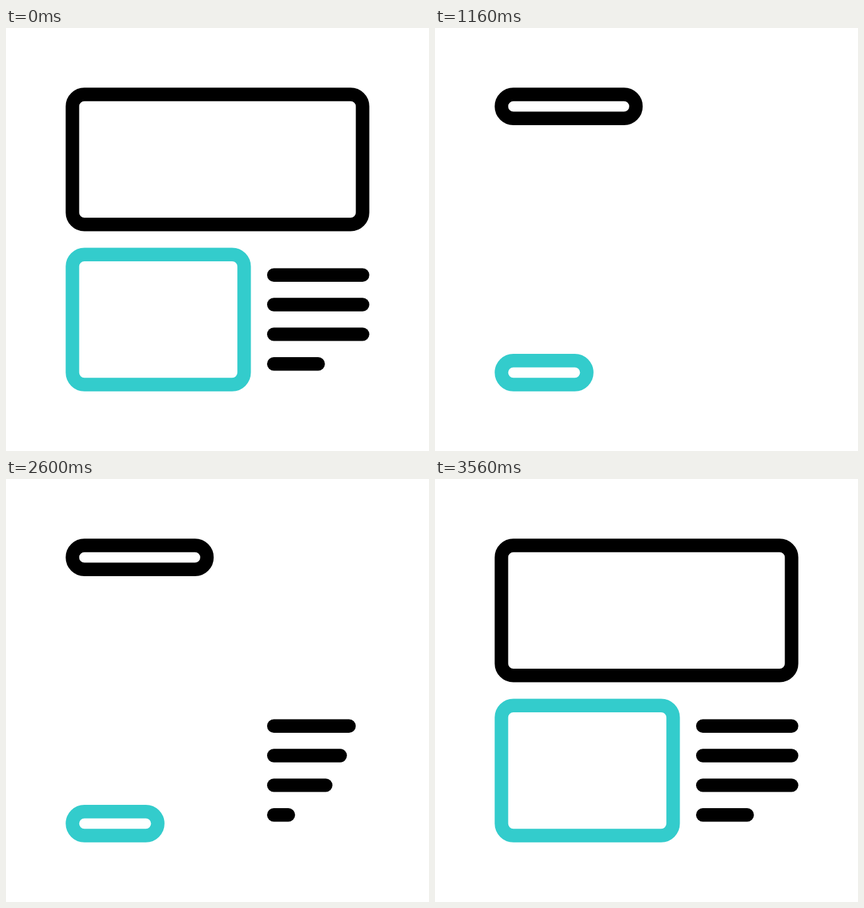
An HTML page that plays this animation: 640 px wide and 640 px high, repeating every 3600 ms.

```html
<!DOCTYPE html>
<html lang="en">
<head>
<meta charset="utf-8">
<title>Layout blocks</title>
<style>
html, body { margin: 0; width: 100%; height: 100%; overflow: hidden; background: #fff; }
svg { display: block; width: 100vw; height: 100vh; }
</style>
</head>
<body>
<svg viewBox="0 0 640 640" fill="none" stroke-width="20.4" stroke-linecap="round">
  <rect id="top" x="100.5" y="100.5" rx="18.15" stroke="#000"/>
  <rect id="card" x="100.5" rx="18.15" stroke="#3cc"/>
  <g id="lines" stroke="#000"></g>
</svg>
<script>
const NS = 'http://www.w3.org/2000/svg';
const LOOP = 3600, STEP = 20, SPAN = 800;
const MIN = 36.3, TALL = 196.8, FLOOR = 539.5;
const top_ = document.getElementById('top');
const card = document.getElementById('card');

// Each line leaves from the bottom up and returns from the top down.
const lines = [0, 1, 2, 3].map(i => {
  const el = document.getElementById('lines').appendChild(document.createElementNS(NS, 'line'));
  const y = 373.7 + 44.83 * i;
  el.setAttribute('x1', 405.2);
  el.setAttribute('y1', y);
  el.setAttribute('y2', y);
  return { el, length: i < 3 ? 134.3 : 67.1, out: 220 - 80 * i, back: 2280 + 80 * i };
});

const clamp = v => Math.min(1, Math.max(0, v));
const mix = (a, b, k) => a + (b - a) * k;

// Cubic bezier (.728, 0, .8, .333); its y component reduces to p squared.
function easeIn(s) {
  let lo = 0, hi = 1;
  for (let i = 0; i < 24; i++) {
    const p = (lo + hi) / 2, q = 1 - p;
    const x = 3 * .728 * p * q * q + 3 * .8 * p * p * q + p ** 3;
    if (x < s) lo = p; else hi = p;
  }
  return lo * lo;
}

const leave = (t, start) => easeIn(clamp((t - start) / SPAN));
const arrive = (t, start) => 1 - easeIn(1 - clamp((t - start) / SPAN));

function setBox(el, w, h) {
  el.setAttribute('width', w);
  el.setAttribute('height', h);
}

function draw(t) {
  // Boxes lose height, then width, and reopen as a mirror in time.
  const m = t < 1880 ? t : 3760 - t;
  const h = mix(TALL, MIN, leave(m, 200));
  const k = arrive(m, 1000);
  setBox(top_, mix(439, MIN, k), h);
  setBox(card, mix(259.8, MIN, k), h);
  card.setAttribute('y', FLOOR - h);

  for (const { el, length, out, back } of lines) {
    const part = t < 1880 ? 1 - leave(t, out) : arrive(t, back);
    el.setAttribute('x2', 405.2 + length * part);
    el.style.display = part > .0005 ? '' : 'none';
  }
}

const began = performance.now();
function tick() {
  const t = (performance.now() - began) % LOOP;
  draw(Math.floor(t / STEP) * STEP);
  requestAnimationFrame(tick);
}
draw(0);
requestAnimationFrame(tick);
</script>
</body>
</html>
```
